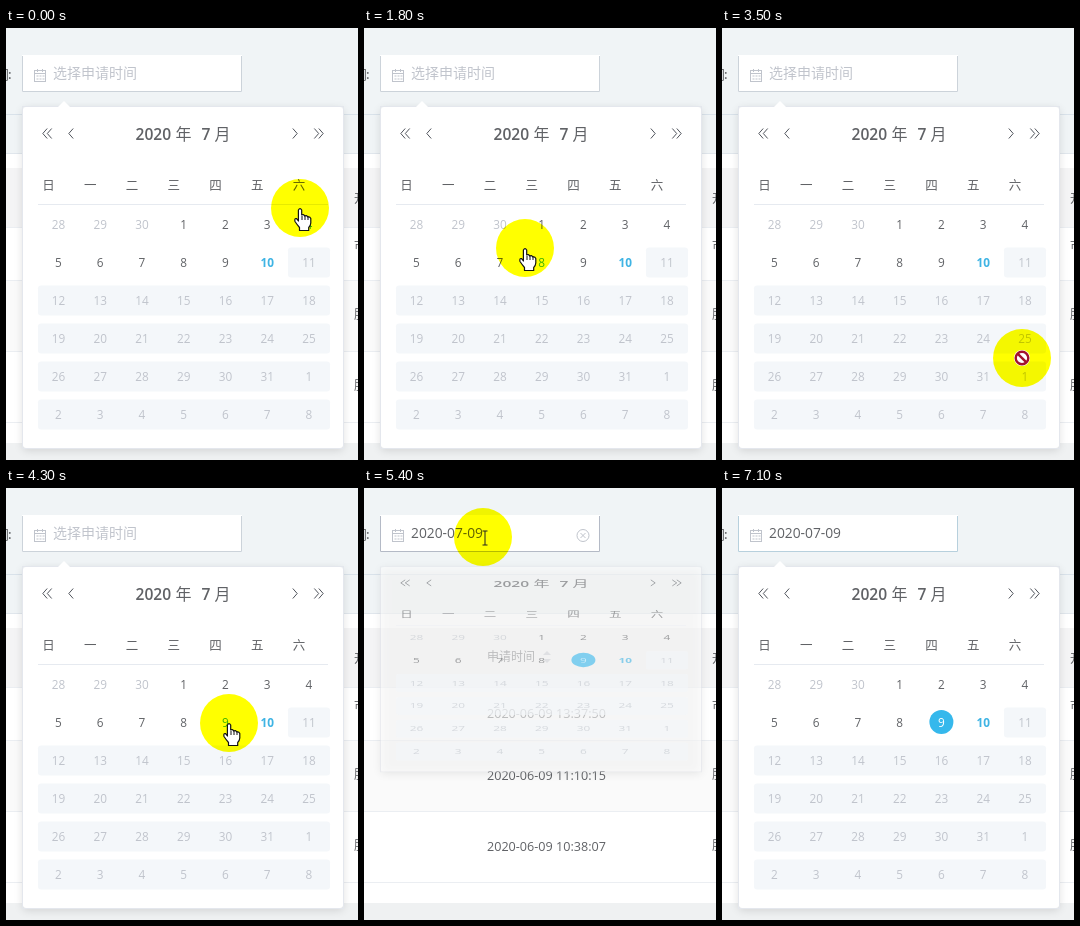
An HTML page with a canvas that plays this animation: 352x432 px, repeating every 8.7 s.

```html
<!DOCTYPE html>
<html lang="zh">
<head>
<meta charset="utf-8">
<style>
html, body { margin: 0; width: 100%; height: 100%; overflow: hidden; background: #f0f4f6; }
canvas { display: block; }
</style>
</head>
<body>
<canvas id="stage" width="352" height="432"></canvas>
<script>
const ctx = document.getElementById('stage').getContext('2d');
const LOOP = 8700, STEP = 100;
const LATIN = '"Open Sans", "Noto Sans", sans-serif';
const CJK = '"Noto Sans CJK SC", "Noto Sans CJK", sans-serif';
const INK = '#606266', PALE = '#c0c4cc', BLUE = '#35b8ec';

// Pointer route: time, x, y
const route = [
  [0, 294, 180], [300, 284, 300], [500, 255, 390], [700, 238, 340], [1000, 238, 340],
  [1300, 320, 285], [1500, 316, 130], [1800, 161, 220], [1900, 163, 228],
  [2200, 195, 320], [2600, 255, 475], [3100, 320, 475], [3500, 300, 330],
  [4000, 232, 252], [4300, 223, 235], [4400, 223, 235], [4900, 150, 110],
  [5200, 118, 47], [5400, 119, 49], [5700, 175, 140], [6200, 270, 280],
  [6700, 302, 350], [7100, 325, 475]
];

const clamp = v => Math.max(0, Math.min(1, v));
const easeOut = p => 1 - Math.pow(1 - clamp(p), 2.26);

function pointerAt(t) {
  const i = route.findIndex(k => k[0] > t);
  if (i < 0) return { x: 325, y: 475 };
  const [t0, x0, y0] = route[i - 1], [t1, x1, y1] = route[i];
  const p = (t - t0) / (t1 - t0);
  return { x: x0 + (x1 - x0) * p, y: y0 + (y1 - y0) * p };
}

function openness(t) {
  if (t < 4500) return 1;
  if (t < 5300) return 1 - easeOut((t - 4400) / 300);
  return easeOut((t - 5300) / 300);
}

function rect(x, y, w, h, color) {
  ctx.fillStyle = color;
  ctx.fillRect(x, y, w, h);
}

function text(str, x, y, size, color, { family = LATIN, weight = 400, align = 'left' } = {}) {
  ctx.font = `${weight} ${size}px ${family}`;
  ctx.fillStyle = color;
  ctx.textAlign = align;
  ctx.textBaseline = 'alphabetic';
  ctx.fillText(str, x, y + size * 0.36);
}

function line(color, width, ...points) {
  ctx.strokeStyle = color;
  ctx.lineWidth = width;
  ctx.beginPath();
  points.forEach(([x, y], i) => i ? ctx.lineTo(x, y) : ctx.moveTo(x, y));
  ctx.stroke();
}

function disc(x, y, r, color) {
  ctx.fillStyle = color;
  ctx.beginPath();
  ctx.arc(x, y, r, 0, Math.PI * 2);
  ctx.fill();
}

function triangle(color, ...points) {
  ctx.fillStyle = color;
  ctx.beginPath();
  points.forEach(p => ctx.lineTo(...p));
  ctx.fill();
}

function drawPage() {
  rect(0, 0, 352, 432, '#f0f4f6');
  rect(0, 86, 352, 1, '#d9e2ea');
  rect(0, 125, 352, 290, '#fff');
  rect(0, 125, 352, 1, '#e0e6ec');
  rect(0, 140, 352, 59, '#f4f4f5');
  rect(0, 253, 352, 70, '#fafafa');
  for (const y of [199, 252, 323, 394]) rect(0, y, 352, 1, '#ebeef2');
  rect(0, 415, 352, 17, '#eff1f2');

  text('申请时间', 123, 169, 12, INK, { family: CJK, weight: 500 });
  triangle(PALE, [179, 167], [187, 167], [183, 163]);
  triangle(PALE, [179, 171], [187, 171], [183, 175]);
  [['13:37:50', 225], ['11:10:15', 287], ['10:38:07', 358]].forEach(([clock, y]) =>
    text('2020-06-09 ' + clock, 123, y, 12.6, INK));
  [['开', 171], ['市', 218], ['服', 287], ['服', 358]].forEach(([word, y]) =>
    text(word, 348, y, 12, INK, { family: CJK }));
}

function drawField(t, over) {
  const chosen = t >= 4500;
  const border = t < 5500 ? (over ? '#b4bac6' : '#ccd3da') : t < 6900 ? '#8fc4e2' : '#b7d0dd';
  text('间', -10, 46, 13, INK, { family: CJK, weight: 500 });
  text(':', 2, 46, 13, INK, { weight: 600 });
  rect(16, 27, 220, 37, '#fff');
  line(border, 1, [16.5, 28], [16.5, 63.5], [235.5, 63.5], [235.5, 28]);

  ctx.strokeStyle = PALE;
  ctx.lineWidth = 1;
  ctx.strokeRect(28.5, 42.5, 11, 11);
  line(PALE, 1, [28, 45.5], [40, 45.5]);
  line(PALE, 1, [31.5, 41], [31.5, 44]);
  line(PALE, 1, [36.5, 41], [36.5, 44]);
  for (const y of [48, 51]) for (const x of [31, 34, 37]) rect(x - 0.5, y - 0.5, 2, 1, PALE);

  if (chosen) text('2020-07-09', 47, 45, 13.8, INK);
  else text('选择申请时间', 47, 45, 14, PALE, { family: CJK });

  if (chosen && over) {
    ctx.strokeStyle = PALE;
    ctx.beginPath();
    ctx.arc(219, 47.5, 6, 0, Math.PI * 2);
    ctx.stroke();
    line(PALE, 1, [216.5, 45], [221.5, 50]);
    line(PALE, 1, [221.5, 45], [216.5, 50]);
  }
}

function chevron(x, dir) {
  line('#50545c', 1, [x - dir * 2.2, 100.5], [x + dir * 2.2, 105.5], [x - dir * 2.2, 110.5]);
}

const columnX = c => 52.4 + c * 41.75;
const rowY = r => 196.5 + r * 38;

function hoveredDay({ x, y }) {
  if (x < 32 || x > 324 || y < 177 || y > 253) return -1;
  const c = Math.min(6, Math.floor((x - 32) / 41.75));
  return Math.floor((y - 177) / 38) * 7 + c;
}

function drawDays(t, pointer) {
  const hover = hoveredDay(pointer);
  for (let r = 1; r < 6; r++) {
    const x = r === 1 ? 282 : 32;
    ctx.fillStyle = '#f4f7fa';
    ctx.beginPath();
    ctx.roundRect(x, rowY(r) - 15, 324 - x, 30, 3);
    ctx.fill();
  }
  for (let i = 0; i < 42; i++) {
    const date = i - 2;
    const label = date < 1 ? date + 30 : date > 31 ? date - 31 : date;
    const x = columnX(i % 7), y = rowY(Math.floor(i / 7));
    const picked = date === 9 && t >= 4500;
    const today = date === 10;
    let color = date < 1 || date > 10 ? PALE : INK;
    if (today || (i === hover && date > 0 && date < 11)) color = '#3fb4e4';
    if (picked) {
      disc(x, y - 0.5, 12, BLUE);
      color = '#fff';
    }
    text(String(label), x, y, 11.8, color, { weight: today ? 700 : 400, align: 'center' });
  }
}

function drawCalendar(t, pointer) {
  const open = openness(t);
  if (open <= 0) return;
  ctx.save();
  ctx.globalAlpha = open;
  ctx.translate(0, 79);
  ctx.scale(1, open);
  ctx.translate(0, -79);

  ctx.save();
  ctx.shadowColor = 'rgba(0,0,0,.14)';
  ctx.shadowBlur = 10;
  ctx.shadowOffsetY = 2;
  ctx.fillStyle = '#fff';
  ctx.beginPath();
  ctx.roundRect(17, 79, 320, 341, 3);
  ctx.fill();
  ctx.restore();
  ctx.strokeStyle = '#e4e7ed';
  ctx.lineWidth = 1;
  ctx.strokeRect(16.5, 78.5, 321, 342);
  if (open === 1) triangle('#fff', [51, 80], [58, 73], [65, 80]);

  [[39, -1], [43.5, -1], [65, -1], [289, 1], [310.5, 1], [315, 1]].forEach(c => chevron(...c));
  text('2020', 129.5, 106, 15.6, INK, { weight: 600 });
  text('年', 169.5, 106, 16, INK, { family: CJK });
  text('7', 195.5, 106, 15.6, INK, { weight: 600 });
  text('月', 208.5, 106, 16, INK, { family: CJK });

  [...'日一二三四五六'].forEach((day, c) =>
    text(day, columnX(c) - 10, 157, 12.5, INK, { family: CJK, align: 'center' }));
  rect(32, 176, 290, 1, '#e6eaf0');
  drawDays(t, pointer);
  ctx.restore();
}

const hand = new Path2D('M-1.6 2Q0-.6 1.7 2V7Q3.3 5.8 4.7 8Q6.4 6.8 7.7 9Q9.8 8.2 10.8 10.5V15Q10.5 18 8.7 19.5V22.5H-.5V19.5Q-3 16.5-5 13.5Q-5.8 10-3.4 10.7L-1.6 13Z');
const arrow = new Path2D('M0 0V16L4 12.5L6.5 18.5L9 17.5L6.5 11.5H11.5Z');

function outline(path) {
  ctx.fillStyle = '#fff';
  ctx.strokeStyle = '#111';
  ctx.lineWidth = 1.2;
  ctx.lineJoin = 'round';
  ctx.fill(path);
  ctx.stroke(path);
}

function drawPointer(t, { x, y }, overField) {
  if (y > 465) return;
  ctx.save();
  ctx.globalCompositeOperation = 'multiply';
  disc(x, y, 29, '#ff0');
  ctx.restore();

  const inPanel = openness(t) > 0.5 && x > 17 && x < 337 && y > 79 && y < 420;
  const day = inPanel ? hoveredDay({ x, y }) : -1;
  const blocked = inPanel && x > 32 && x < 324 && (day === 13 || (y > 253 && y < 405));
  ctx.save();
  ctx.translate(x, y);
  if (overField) {
    line('#222', 1, [-0.5, -6], [2, -6]);
    line('#222', 1, [2, -6], [2, 8]);
    line('#222', 1, [2, -6], [4.5, -6]);
    line('#222', 1, [-0.5, 8], [4.5, 8]);
  } else if (blocked) {
    disc(0, 0, 8, '#fff');
    ctx.strokeStyle = '#a3112e';
    ctx.lineWidth = 2.4;
    ctx.beginPath();
    ctx.arc(0, 0, 6.3, 0, Math.PI * 2);
    ctx.stroke();
    line('#a3112e', 2.4, [-4.4, -4.4], [4.4, 4.4]);
  } else {
    outline(day >= 0 ? hand : arrow);
    if (day >= 0) for (const k of [2, 5, 8]) line('#111', 1, [k, 8], [k, 12]);
  }
  ctx.restore();
}

function draw(now) {
  const t = Math.floor((now % LOOP) / STEP) * STEP;
  const pointer = pointerAt(t);
  const overField = pointer.x > 16 && pointer.x < 236 && pointer.y > 27 && pointer.y < 64;
  ctx.clearRect(0, 0, 352, 432);
  drawPage();
  drawField(t, overField);
  drawCalendar(t, pointer);
  drawPointer(t, pointer, overField);
}

const start = performance.now();
function frame() {
  draw(performance.now() - start);
  requestAnimationFrame(frame);
}
frame();
</script>
</body>
</html>
```
